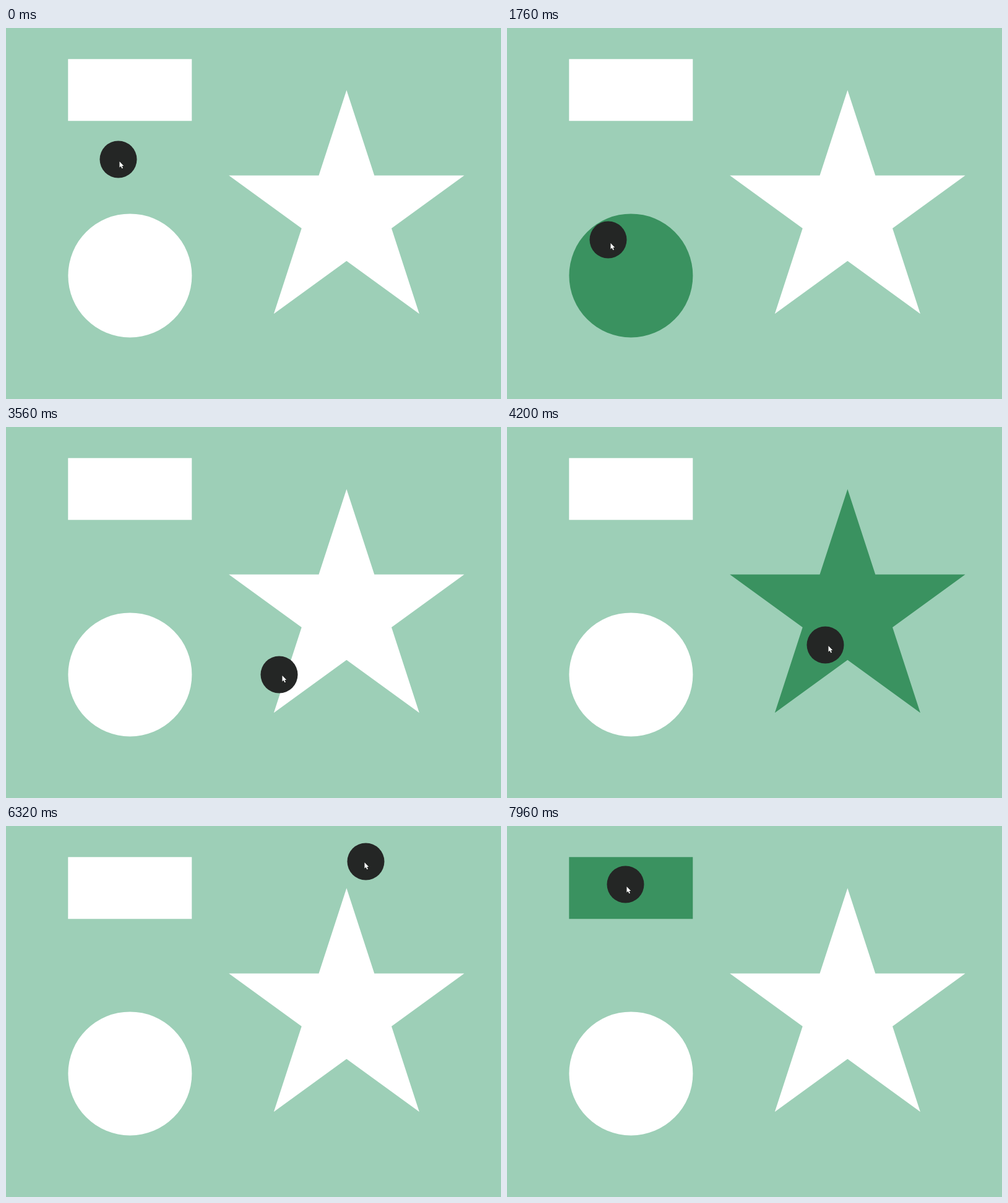
Animation, 800 px wide and 600 px high, one loop 8 s. Source, as an HTML page with a canvas:

```html
<!DOCTYPE html>
<html lang="en">
<head>
<meta charset="utf-8">
<title>Ball inside shapes</title>
<style>
  html, body { margin: 0; height: 100%; overflow: hidden; background: #9dcfb7; }
  canvas { display: block; }
</style>
</head>
<body>
<canvas id="stage" width="800" height="600"></canvas>
<script>
const ctx = document.getElementById('stage').getContext('2d');
const LOOP = 8000, STEP = 40, LEAD = 25, RADIUS = 30, TAU = Math.PI * 2;

// Key points of the ball's smooth route; it rests before the first one.
const route = [
  { t: 420, x: 181, y: 212 }, { t: 920, x: 146, y: 246 }, { t: 1240, x: 146, y: 288 },
  { t: 2640, x: 236, y: 425 }, { t: 2920, x: 298, y: 428 }, { t: 3560, x: 441, y: 400 },
  { t: 5000, x: 587, y: 283 }, { t: 5440, x: 618, y: 227 }, { t: 6000, x: 611, y: 99 },
  { t: 6320, x: 581, y: 57 }, { t: 6600, x: 512, y: 47 }, { t: 7120, x: 292, y: 65 },
  { t: 7960, x: 191, y: 94 }
];

// Flat at the ends and at turning points, so the curve never overshoots them.
function slope(i, axis) {
  const a = route[i - 1], b = route[i], c = route[i + 1];
  if (!a || !c || (b[axis] - a[axis]) * (c[axis] - b[axis]) <= 0) return 0;
  return (c[axis] - a[axis]) / (c.t - a.t);
}

function ballAt(time) {
  const t = Math.max(route[0].t, Math.min(time, route.at(-1).t));
  const i = Math.max(1, route.findIndex(p => p.t >= t));
  const a = route[i - 1], b = route[i], span = b.t - a.t;
  const u = (t - a.t) / span, v = 1 - u;
  return ['x', 'y'].map(axis => Math.round(
    v * v * (1 + 2 * u) * a[axis] + u * u * (3 - 2 * u) * b[axis] +
    span * u * v * (v * slope(i - 1, axis) - u * slope(i, axis))));
}

function disc(x, y, r) {
  const path = new Path2D();
  path.arc(x, y, r, 0, TAU);
  return path;
}

function starPath(x, y, outer, inner) {
  const path = new Path2D();
  for (let i = 0; i < 10; i++) {
    const angle = i * TAU / 10, r = i % 2 ? inner : outer;
    path.lineTo(x + r * Math.sin(angle), y - r * Math.cos(angle));
  }
  path.closePath();
  return path;
}

const box = new Path2D();
box.rect(100.3, 50.3, 200, 100);
const shapes = [box, disc(200.4, 400.4, 100), starPath(550.4, 300.4, 200, 76.4)];
const pointer = new Path2D('M0 0V9.5L2.2 7.6 3.9 11.3 5.4 10.6 3.8 7H6.7Z');

function holdsBall(shape, x, y) {
  for (let a = 0; a < TAU; a += TAU / 48) {
    if (!ctx.isPointInPath(shape, x + RADIUS * Math.cos(a), y + RADIUS * Math.sin(a))) return false;
  }
  return true;
}

function fill(path, color) {
  ctx.fillStyle = color;
  ctx.fill(path);
}

function draw(now) {
  const t = Math.floor(now % LOOP / STEP) * STEP;
  const [x, y] = ballAt(t);
  const [leadX, leadY] = ballAt(t + LEAD);

  ctx.fillStyle = '#9dcfb7';
  ctx.fillRect(0, 0, 800, 600);
  shapes.forEach(shape => fill(shape, holdsBall(shape, x, y) ? '#3a9260' : '#fff'));
  fill(disc(x + 0.5, y + 0.5, RADIUS), '#242625');

  ctx.save();
  ctx.translate(leadX + 2.5, leadY + 4);
  fill(pointer, '#fff');
  ctx.restore();
  requestAnimationFrame(draw);
}
requestAnimationFrame(draw);
</script>
</body>
</html>
```
